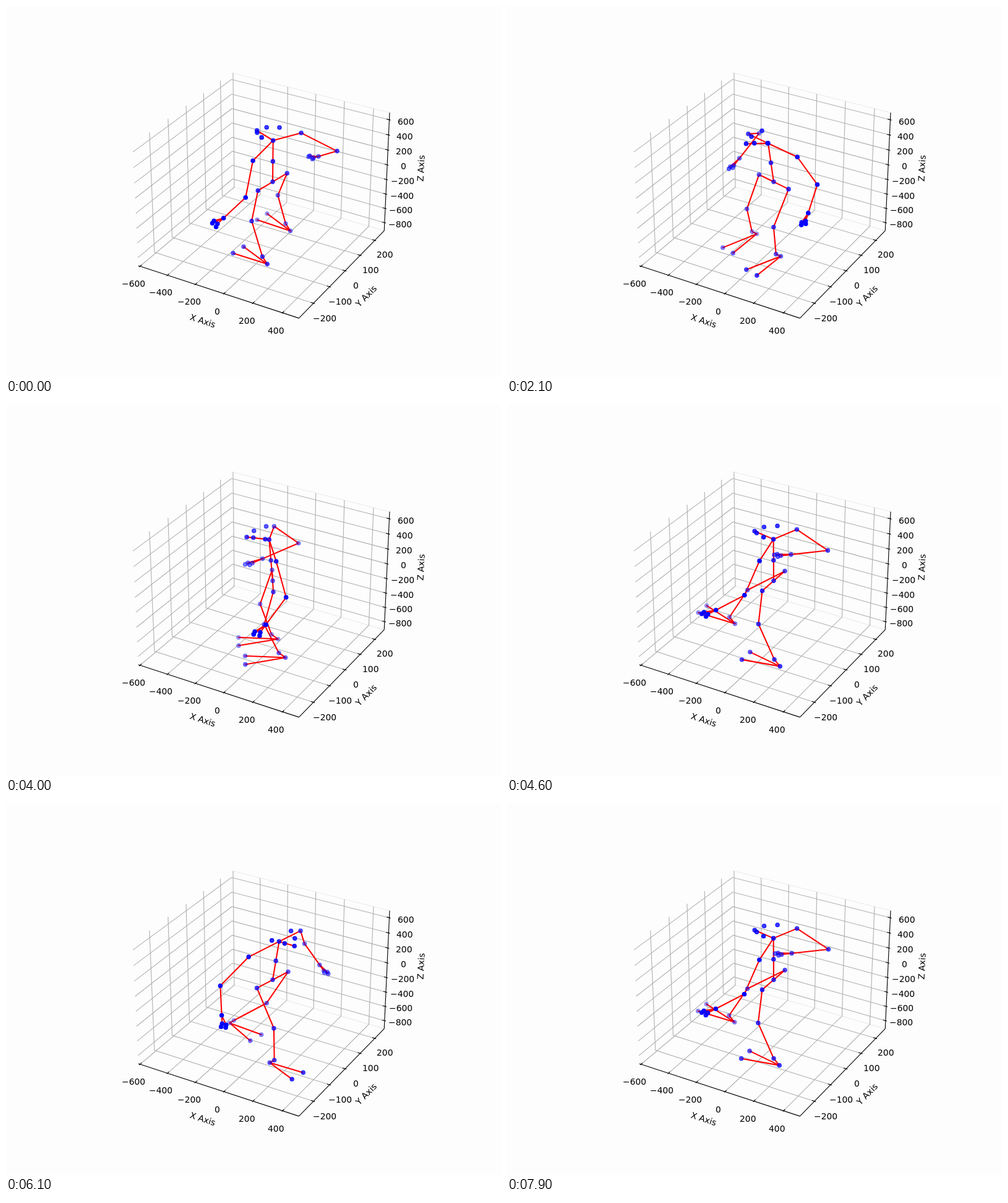
Animation of 800x600 px, one loop 8 s. Source, as an HTML page with a canvas:

```html
<!DOCTYPE html>
<html lang="en">
<head>
<meta charset="utf-8">
<title>3D skeleton</title>
<style>
  html, body { margin: 0; width: 100%; height: 100%; overflow: hidden; background: #fdfdfd; }
  canvas { display: block; }
</style>
</head>
<body>
<canvas id="stage" width="800" height="600"></canvas>
<script>
const ctx = document.getElementById('stage').getContext('2d');
const LOOP = 8000, STEP = 100;
const THIN = 1.11, THICK = 2.08;
const rad = degrees => degrees * Math.PI / 180;

// ---- Projection: perspective view from elevation 30, azimuth -60 ----
const LOW = [-612, -288, -913], HIGH = [509, 266.5, 692];
const SIZE = [1.1905, 1.1905, 0.8929];
const DISTANCE = 10, SCALE = 2497.3;
const range = HIGH.map((v, i) => v - LOW[i]);
const dot3 = (a, b) => a[0] * b[0] + a[1] * b[1] + a[2] * b[2];

const elev = rad(30), azim = rad(-60);
const RIGHT = [-Math.sin(azim), Math.cos(azim), 0];
const TOWARD = [Math.cos(azim) * Math.cos(elev), Math.sin(azim) * Math.cos(elev), Math.sin(elev)];
const UP = [-Math.cos(azim) * Math.sin(elev), -Math.sin(azim) * Math.sin(elev), Math.cos(elev)];

// Returns screen x, screen y and distance from the eye.
function project(p) {
  const box = p.map((v, i) => ((v - LOW[i]) / range[i] - 0.5) * SIZE[i]);
  const far = DISTANCE - dot3(box, TOWARD);
  return [416.24 + SCALE * dot3(box, RIGHT) / far, 296.76 - SCALE * dot3(box, UP) / far, far];
}

function line(points, color, width) {
  ctx.strokeStyle = color;
  ctx.lineWidth = width;
  ctx.beginPath();
  points.forEach(p => ctx.lineTo(...project(p).slice(0, 2)));
  ctx.stroke();
}

// ---- Axes ----
// edge: where the axis runs; wall: start, bend and end of a grid line; side: direction of the ticks
const [X0, Y0, Z0] = LOW, [X1, Y1, Z1] = HIGH;
const axes = [
  { name: 'X Axis', step: 200, side: 1, edge: v => [v, Y0, Z0], wall: v => [[v, Y0, Z0], [v, Y1, Z0], [v, Y1, Z1]] },
  { name: 'Y Axis', step: 100, side: 0, edge: v => [X1, v, Z0], wall: v => [[X0, v, Z1], [X0, v, Z0], [X1, v, Z0]] },
  { name: 'Z Axis', step: 200, side: 0, edge: v => [X1, Y1, v], wall: v => [[X0, Y0, v], [X0, Y1, v], [X1, Y1, v]] }
];

function ticks(i) {
  const list = [], { step } = axes[i];
  for (let v = Math.ceil(LOW[i] / step) * step; v <= HIGH[i]; v += step) list.push(v);
  return list;
}

// Moves a point on an edge away from the box, in all directions but its own.
const outward = (p, own, amount) => p.map((v, i) =>
  i === own ? v : v + (v === HIGH[i] ? 1 : -1) * amount * range[i]);

function drawAxis({ name, side, edge }, i) {
  const ends = [edge(LOW[i]), edge(HIGH[i])];
  line(ends, '#000', THIN);
  ctx.textAlign = 'left';
  ticks(i).forEach(v => {
    const p = edge(v), inner = [...p], outer = [...p];
    const sign = p[side] === HIGH[side] ? 1 : -1;
    inner[side] -= sign * 0.016 * range[side];
    outer[side] += sign * 0.008 * range[side];
    line([inner, outer], '#000', THIN);
    const text = String(v).replace('-', '\u2212');
    const [x, y] = project(outward(p, i, 0.0664));
    ctx.fillText(text, Math.round(x - ctx.measureText(text).width / 2), Math.round(y + 10.9));
  });

  const [a, b] = ends.map(project);
  const [x, y] = project(outward(edge((LOW[i] + HIGH[i]) / 2), i, 0.1443));
  ctx.save();
  ctx.translate(x, y);
  ctx.rotate(Math.atan2(b[1] - a[1], b[0] - a[0]));
  ctx.textAlign = 'center';
  ctx.fillText(name, 0, 3.8);
  ctx.restore();
}

function drawBox() {
  ctx.lineCap = 'butt';
  ctx.lineJoin = 'miter';
  ctx.font = '13.89px "DejaVu Sans", sans-serif';
  ctx.fillStyle = '#000';
  [Z0, Z1].forEach(z => line([[X0, Y1, z], [X1, Y1, z]], '#ebebeb', THIN));
  axes.forEach(({ wall }, i) => ticks(i).forEach(v => line(wall(v), '#b0b0b0', THIN)));
  axes.forEach(drawAxis);
}

// ---- Motion ----
// yaw, then forward and sideways offsets of ankles (from the pelvis)
// and wrists (from the shoulders), first for limb a, then for limb b
const pose = (yaw, ankleA, ankleB, wristA, wristB) =>
  [yaw, ...ankleA, ...ankleB, ...wristA, ...wristB];
const ready  = pose(169, [-64, 155], [70, -192], [-39, 279], [-21, -135]);
const stride = pose(170, [-57, 140], [248, 43], [153, 264], [37, 5]);
const lifted = pose(180, [-112, 174], [351, -44], [138, 244], [35, 0]);
const aside  = pose(214, [-34, 136], [4, -67], [66, 325], [70, 46]);
const narrow = pose(215, [79, 152], [-5, -90], [65, 311], [9, -3]);
const open   = pose(280, [46, 75], [46, -206], [118, 133], [-9, -144]);
const turned = pose(347, [-301, -60], [184, -147], [45, 118], [84, -281]);

const keys = [
  [0, ready], [650, lifted], [1200, stride], [1750, narrow], [2300, open],
  [3000, turned], [3500, open], [4000, aside], [4650, lifted], [5300, narrow],
  [5750, open], [6150, turned], [6800, open], [7350, aside], [7900, lifted]
];

function poseAt(t) {
  let i = 0;
  while (i < keys.length - 2 && t >= keys[i + 1][0]) i++;
  const at = n => keys[Math.max(0, Math.min(keys.length - 1, n))];
  const [t0, p0] = at(i - 1), [t1, p1] = at(i), [t2, p2] = at(i + 1), [t3, p3] = at(i + 2);
  const span = t2 - t1;
  const u = Math.min(1, (t - t1) / span);
  const u2 = u * u, u3 = u2 * u;
  return p1.map((v, n) => {
    const m1 = (p2[n] - p0[n]) / (t2 - t0) * span;
    const m2 = (p3[n] - v) / (t3 - t1) * span;
    return v * (2 * u3 - 3 * u2 + 1) + m1 * (u3 - 2 * u2 + u)
      + p2[n] * (3 * u2 - 2 * u3) + m2 * (u3 - u2);
  });
}

// ---- Body: local vectors are [forward, side, up] ----
const DEPTH = 0.55;
const HIP = 125, SHOULDER = 205, TORSO = 545;
const LEG = [425, 405], LEG_REACH = 818;
const ARM = [310, 250], ARM_REACH = 530;

const add = (a, b, k = 1) => a.map((v, i) => v + b[i] * k);
const scale = (a, k) => a.map(v => v * k);
const unit = a => scale(a, 1 / (Math.hypot(...a) || 1));
const drop = (reach, f, s) => -Math.sqrt(Math.max(0, reach * reach - f * f - s * s));

// Middle joint of a two-bone limb that bends towards pole.
function bend(from, to, [l1, l2], pole) {
  const d = add(to, from, -1), len = Math.hypot(...d);
  const along = (l1 * l1 - l2 * l2 + len * len) / (2 * len);
  const dir = unit(d);
  const out = unit(add(pole, dir, -dot3(pole, dir)));
  return add(add(from, dir, along), out, Math.sqrt(Math.max(0, l1 * l1 - along * along)));
}

function turn([f, s, u], degrees) {
  const c = Math.cos(rad(degrees)), n = Math.sin(rad(degrees));
  return [f * c - s * n, f * n + s * c, u];
}

function leg(side, f, s) {
  const hip = [0, side * HIP, 0];
  const ankle = [f, s, drop(LEG_REACH, f, s - hip[1])];
  const knee = bend(hip, ankle, LEG, [1, 0, 0]);
  const heel = add(ankle, [-40, 0, -70]);
  const lift = Math.max(0, f * 0.2);
  return [hip, knee, ankle, heel, add(heel, [240, 45, lift]), add(heel, [240, -45, lift])];
}

function arm(side, neck, f, s) {
  const shoulder = add(neck, [-35, side * SHOULDER, -55]);
  const reach = side > 0 ? ARM_REACH : Math.min(ARM_REACH, 350 + 0.65 * Math.abs(s));
  const wrist = add(shoulder, [f, s, drop(reach, f, s)]);
  const elbow = bend(shoulder, wrist, ARM, [-1, side * 0.3, 0]);
  const dir = unit(add(wrist, elbow, -1));
  const finger = (along, front) => add(add(wrist, dir, along), [front, 0, 0]);
  return [shoulder, elbow, wrist, finger(60, 35), finger(70, 0), finger(85, 30), finger(100, -10)];
}

function buildBody([yaw, ...v]) {
  const lean = 25 - 35 * Math.cos(rad(yaw - 130));
  const neck = [lean, 0, TORSO];
  // The head trails behind halfway through a turn.
  const lag = -35 * Math.sin(rad(yaw)) ** 4;
  const face = (f, s, u) => add(neck, turn([f, s, u], lag));
  const place = p => {
    const [x, y, z] = turn(p, yaw);
    return [x, y * DEPTH, z];
  };
  return {
    trunk: [face(130, 0, 40), neck, scale(neck, 0.5), [0, 0, 0]].map(place),
    face: [1, -1].flatMap(side => [face(90, side * 40, 75), face(20, side * 75, 90)]).map(place),
    legs: [leg(1, v[0], v[1]), leg(-1, v[2], v[3])].map(l => l.map(place)),
    arms: [arm(1, neck, v[4], v[5]), arm(-1, neck, v[6], v[7])].map(a => a.map(place))
  };
}

function drawBody({ trunk, face, legs, arms }) {
  const bone = (...points) => line(points, '#f00', THICK);
  ctx.lineCap = 'square';
  ctx.lineJoin = 'round';
  bone(...trunk);
  arms.forEach((a, i) => {
    bone(trunk[1], ...a.slice(0, 4));
    bone(a[2], a[4]);
    if (!i) bone(a[2], a[5]);
  });
  legs.forEach(l => {
    bone(trunk[3], ...l.slice(0, 5));
    bone(l[3], l[5]);
  });

  // Dots fade with distance, from 1 for the nearest to 0.3 for the farthest.
  const dots = [...trunk, ...face, ...legs.flat(), ...arms.flat()].map(project);
  const depths = dots.map(d => d[2]);
  const near = Math.min(...depths), far = Math.max(...depths);
  ctx.fillStyle = ctx.strokeStyle = '#00f';
  ctx.lineWidth = 1.39;
  dots.sort((a, b) => b[2] - a[2]).forEach(([x, y, depth]) => {
    ctx.globalAlpha = 1 - 0.7 * (depth - near) / (far - near);
    ctx.beginPath();
    ctx.arc(x, y, 3.1, 0, Math.PI * 2);
    ctx.fill();
    ctx.stroke();
  });
  ctx.globalAlpha = 1;
}

const start = performance.now();
function frame(now) {
  const t = Math.max(0, now - start) % LOOP;
  ctx.fillStyle = '#fdfdfd';
  ctx.fillRect(0, 0, 800, 600);
  drawBox();
  drawBody(buildBody(poseAt(Math.floor(t / STEP) * STEP)));
  requestAnimationFrame(frame);
}
frame(start);
</script>
</body>
</html>
```
